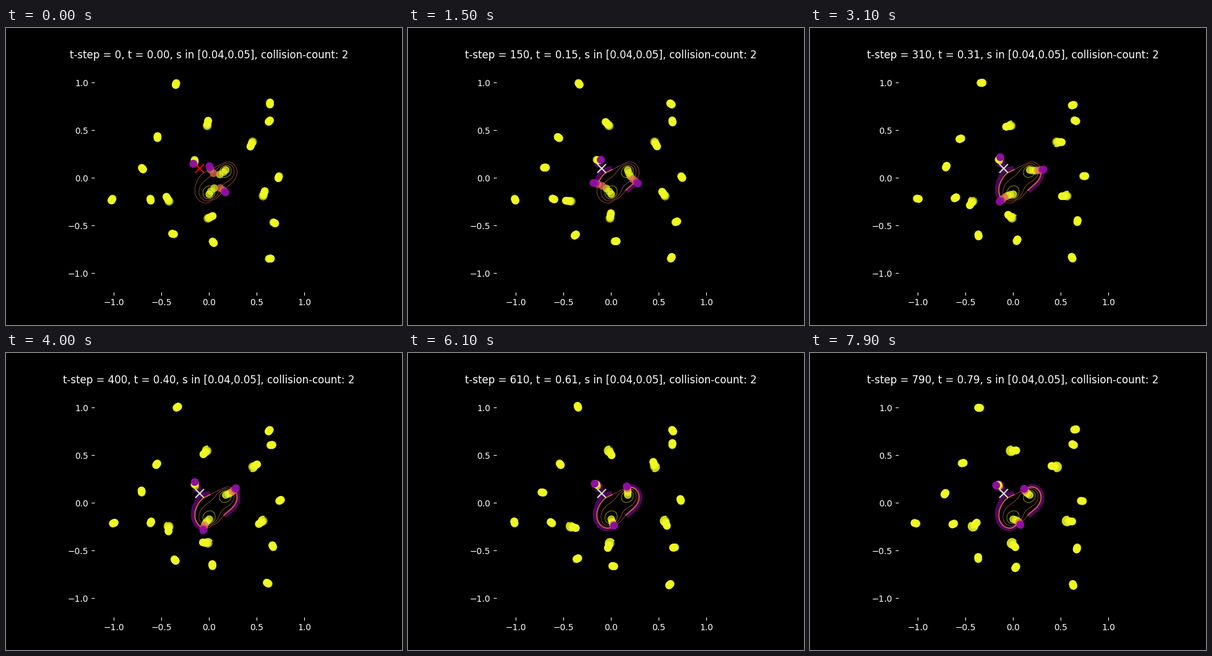
Animation, 640 px wide and 480 px high, one loop 8 s. Source, as a matplotlib script:

```python
from itertools import permutations

import matplotlib.pyplot as plt
import numpy as np
from matplotlib.animation import FuncAnimation

FRAMES = 80
STEPS_PER_FRAME = 10
STEPS = 1000
LEVELS = [0, 0.2, 0.4, 0.6, 0.8, 0.9, 1]  # loop radius, 1 is s = 0.05
TURN = np.exp(2j * np.pi * np.arange(STEPS + 1) / STEPS)
YELLOW, SALMON, PURPLE = (plt.cm.plasma(v) for v in (1.0, 0.65, 0.3))

# Rest point and heading in degrees of each eigenvalue that moves alone.
FREE = np.array([
    (-0.342, 0.998, -108), (0.640, 0.769, 87), (0.643, 0.606, 225),
    (-0.019, 0.548, 79), (0.458, 0.379, 245), (-0.540, 0.416, 88),
    (-0.706, 0.108, -50), (0.736, 0.020, -110), (-1.011, -0.216, 240),
    (-0.615, -0.215, 281), (-0.419, -0.244, 120), (0.568, -0.189, 71),
    (0.675, -0.465, -30), (-0.010, -0.423, 26), (-0.364, -0.590, 167),
    (0.037, -0.665, -50), (0.627, -0.848, 5),
])

# Turn and strength, with the places of the three coupled eigenvalues.
KEYS = [
    (0.00, 0, (-0.149 + 0.191j, 0.006 - 0.173j, 0.172 + 0.081j)),
    (0.00, 1, (-0.169 + 0.145j, 0.006 + 0.126j, 0.182 - 0.153j)),
    (0.09, 1, (-0.149 + 0.042j, -0.091 + 0.165j, 0.234 - 0.101j)),
    (0.31, 1, (-0.143 - 0.257j, -0.136 + 0.223j, 0.325 + 0.094j)),
    (0.49, 1, (0.000 - 0.270j, -0.162 + 0.217j, 0.227 + 0.184j)),
    (0.79, 1, (0.078 - 0.225j, -0.175 + 0.184j, 0.117 + 0.152j)),
]
TERMS = [(j, k) for j, top in ((2, 2), (1, 3), (0, 3)) for k in range(top + 1)]


def fit_cubic():
    """Least-squares cubic in z whose coefficients are polynomials in u."""
    rows, rhs = [], []
    for t, s, roots in KEYS:
        u = s * np.exp(2j * np.pi * t)
        for z in roots:
            w = 1 / np.prod([abs(z - r) for r in roots if r != z])
            rows.append([w * u**k * z**j for j, k in TERMS])
            rhs.append(-w * z**3)
    return np.linalg.lstsq(np.array(rows), np.array(rhs), rcond=None)[0]


COEF = fit_cubic()


def trio_roots(u):
    poly = np.array([1, 0, 0, 0], complex)
    for (j, k), c in zip(TERMS, COEF):
        poly[3 - j] += c * u**k
    return np.roots(poly)


def trio_paths(s):
    """Three continuous tracks; the first starts at the upper-left member."""
    now = trio_roots(s)
    now = now[np.argsort(abs(now - KEYS[0][2][0]))]
    out = []
    for w in TURN:
        new = trio_roots(s * w)
        now = min((new[list(p)] for p in permutations(range(3))),
                  key=lambda q: np.sum(abs(q - now) ** 2))
        out.append(now)
    return np.array(out).T


def free_paths(s):
    """Circles around the rest points, wider near the middle."""
    x, y, heading = FREE.T
    reach = np.where(np.hypot(x, y) < 0.62, 0.055, 0.024)
    shift = reach * np.exp(1j * np.radians(heading))
    return (x + 1j * y)[:, None] + s * np.outer(shift, TURN)


def colors(s):
    if s > 0.85:
        trio = [PURPLE] * 3
    elif s > 0.5:
        trio = [YELLOW, SALMON, SALMON]
    else:
        trio = [YELLOW] * 3
    return [YELLOW] * len(FREE) + trio


PATHS = {s: np.vstack([free_paths(s), trio_paths(s)]) for s in LEVELS}

plt.style.use("dark_background")
fig, ax = plt.subplots(figsize=(6.4, 4.8), dpi=100)
ax.set(xlim=(-1.2, 1.2), ylim=(-1.2, 1.2), aspect="equal")
ticks = np.linspace(-1, 1, 5)
ax.set_xticks(ticks)
ax.set_yticks(ticks)
for spine in ax.spines.values():
    spine.set_visible(False)
title = ax.set_title("")

for s in LEVELS[1:5]:
    for z, c in zip(PATHS[s], colors(s)):
        ax.plot(z.real, z.imag, color=c, lw=0.5, alpha=0.8, zorder=2)

trails = []
for s in (0.9, 0.8):
    for z, c in zip(PATHS[s], colors(s)):
        lw, alpha = (4.5, 0.55) if c == PURPLE else (1.5, 0.7)
        line, = ax.plot([], [], color=c, lw=lw, alpha=alpha, zorder=2.5,
                        solid_capstyle="butt")
        trails.append((line, z))

dots = [(ax.scatter(z[:, 0].real, z[:, 0].imag, s=80, c=colors(s),
                    alpha=0.95 if s == 1 else 0.7, linewidths=0, zorder=3), z)
        for s, z in PATHS.items()]
cross, = ax.plot(-0.1, 0.1, "x", ms=10, mew=1.5, zorder=4)


def draw(n):
    k = n * STEPS_PER_FRAME
    title.set_text(f"t-step = {k}, t = {k / STEPS:.2f}, "
                   "s in [0.04,0.05], collision-count: 2")
    for line, z in trails:
        line.set_data(z[:k + 1].real, z[:k + 1].imag)
    for dot, z in dots:
        dot.set_offsets(np.column_stack([z[:, k].real, z[:, k].imag]))
    cross.set_color("red" if n == 0 else "gainsboro")
    return []


anim = FuncAnimation(fig, draw, frames=FRAMES, interval=100,
                     repeat=True, repeat_delay=0)
plt.show()
```
